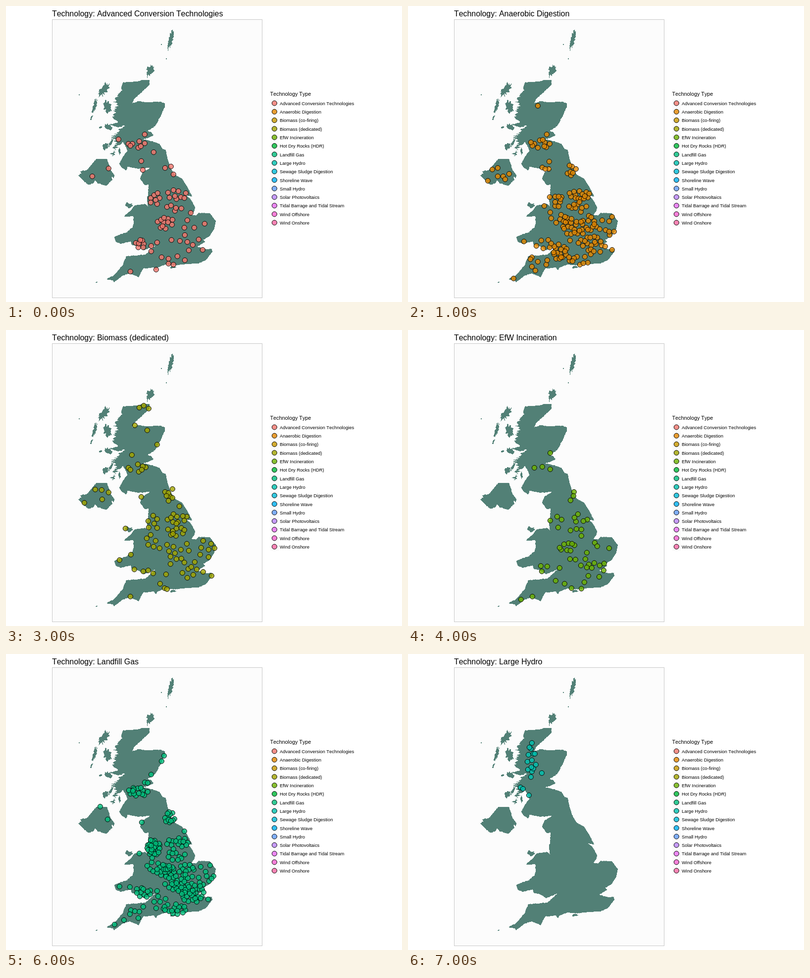
Recreate the animation shown at these times as an HTML page. Size 800 px wide and 600 px high, loop 8000 ms.

```html
<!DOCTYPE html>
<html lang="en">
<head>
<meta charset="utf-8">
<title>Renewable technologies map</title>
<style>
html, body { margin: 0; width: 100%; height: 100%; overflow: hidden; background: #fff; }
svg { display: block; width: 800px; height: 600px; font-family: "Liberation Sans", Arial, sans-serif; font-kerning: none; }
.land { fill: #528076; shape-rendering: crispEdges; }
.dot { stroke: #000; stroke-width: 1; fill-opacity: .8; }
.set { visibility: hidden; }
.head { font-size: 15.9px; white-space: pre; }
.key { font-size: 9.4px; }
</style>
</head>
<body>
<svg id="stage" viewBox="0 0 800 600"></svg>
<script>
const STEP = 1000;
const svg = document.getElementById('stage');

function add(parent, tag, attrs, text) {
  const el = document.createElementNS(svg.namespaceURI, tag);
  for (const k in attrs) el.setAttribute(k, attrs[k]);
  if (text) el.textContent = text;
  parent.appendChild(el);
  return el;
}

function random(seed) {
  return () => {
    seed = (seed * 1664525 + 1013904223) >>> 0;
    return seed / 4294967296;
  };
}

const parse = (s = '') => s.split(' ').filter(Boolean).map(p => p.split(',').map(Number));

// Subdivides a coastline and shakes the new points to make it ragged.
const shake = random(11);
function rough(text, ax, ay = ax) {
  const pts = parse(text);
  return pts.flatMap(([x, y], i) => {
    const [u, v] = pts[i + 1] || [x, y];
    const n = Math.max(1, Math.floor(Math.hypot(u - x, v - y) / 2));
    return Array.from({ length: n }, (_, k) => {
      const t = k / n, free = k ? 2 : 0;
      return [x + (u - x) * t + (shake() - .5) * free * ax, y + (v - y) * t + (shake() - .5) * free * ay];
    });
  });
}

// Ragged leaning ellipse for a small island.
function island([x, y, w, h, lean]) {
  const n = 8 + 2 * h;
  return Array.from({ length: n }, (_, k) => {
    const a = k / n * 2 * Math.PI, r = h > 2 ? 1.15 - .6 * shake() : 1;
    return [x + w * r * Math.cos(a) + lean * Math.sin(a), y + h * r * Math.sin(a)];
  });
}

const mainland = [
  // North and east Scotland
  ...rough('236,155 264,153 277,150 290,150 290,160 275,174 260,187 255,197 270,193 280,195 312,194 321,197 321,204 315,218 308,232 301,244 286,253 294,256 299,262 286,268 277,270 290,273 304,277', .6),
  // North Sea coast
  ...rough('311,280 316,290 323,292 327,312 334,332 341,342 356,350 368,370 376,386 363,384 372,390 382,408 380,417 374,423 384,425 390,419 412,420 424,436 421,451 411,467 398,474 403,478 386,488 404,493 416,492 417,498 404,515 388,522', .5),
  // Channel and Severn
  ...rough('362,523 342,526 322,524 306,530 303,536 299,530 277,532 268,550 250,542 235,547 218,560 215,556 203,554 219,545 236,525 243,507 282,504 301,486 279,495 266,487 254,484 252,477 232,482 222,478 219,468', .6),
  // Wales, Lancashire, Solway
  ...rough('228,464 244,459 256,448 258,440 257,426 238,427 256,410 260,404 280,401 287,406 285,393 287,380 288,362 280,363 271,350 276,337 291,328 268,330 245,326 243,334 234,327 229,320 234,309 245,294 243,287 236,275', .7),
  // West Highlands
  ...rough('232,281 226,283 218,304 213,306 222,272 213,268 229,252 238,242 225,246 211,241 225,236 217,222 224,207 219,188 227,180 233,165', 5, 1)
];

const ulster = rough('146,343 152,340 150,335 163,333 175,318 182,310 204,310 211,331 219,343 217,350 213,343 215,352 203,364 186,360 180,353 176,360 166,362 152,350', .8);

// x, y, half width, half height, lean
const islands = [
  [333, 68, 5, 23, -5], [314, 78, 1, 1, 0], [324, 107, 1, 1, 0], [291, 131, 8, 14, -4],
  [198, 169, 9, 15, -7], [179, 204, 4, 16, -4], [173, 226, 2, 5, -2], [148, 180, 1, 1, 0],
  [205, 205, 9, 14, 4], [207, 246, 9, 7, 3], [191, 246, 3, 2, -1], [212, 277, 3, 9, -4],
  [201, 284, 6, 8, -1], [229, 294, 3, 7, 0], [247, 404, 9, 6, 1], [337, 529, 7, 3, 0], [183, 560, 2, 1, -1]
];

// x, y, half width, half height
const regions = {
  glens: [248, 218, 9, 34], clyde: [266, 279, 24, 9], ulster: [188, 337, 22, 16], cumbria: [278, 324, 12, 11],
  tyne: [330, 333, 11, 14], mersey: [298, 392, 14, 17], york: [346, 382, 22, 12], trent: [343, 406, 18, 12],
  marches: [296, 426, 13, 16], midlands: [322, 439, 18, 13], fens: [367, 439, 18, 17], anglia: [402, 447, 18, 21],
  oxford: [342, 465, 22, 16], london: [376, 484, 24, 20], severn: [308, 497, 15, 19], wessex: [340, 516, 26, 11],
  gwent: [276, 483, 18, 10], devon: [264, 522, 20, 20]
};

// at: lone places, near: dots per region
const techs = [
  { name: 'Advanced Conversion Technologies', color: '#F8766D',
    at: '280,260 227,270 298,296 338,341 373,419 401,441 397,494 251,538 303,534',
    near: { clyde: 7, ulster: 2, cumbria: 2, tyne: 2, mersey: 7, york: 9, trent: 5, midlands: 11, fens: 3, oxford: 3, london: 4, severn: 3, wessex: 5, gwent: 8 } },
  { name: 'Anaerobic Digestion', color: '#E58700',
    at: '262,202 280,260 161,354 275,405 412,427 416,457 412,494 234,477 213,552',
    near: { clyde: 10, ulster: 6, cumbria: 4, tyne: 7, mersey: 9, york: 14, trent: 9, marches: 5, midlands: 13, fens: 13, anglia: 6, oxford: 12, london: 17, severn: 16, wessex: 9, gwent: 6, devon: 7 } },
  { name: 'Biomass (co-firing)', color: '#C99800',
    at: '268,264 285,268 330,311 268,491',
    near: { york: 4, trent: 4, mersey: 2, midlands: 3, london: 3, wessex: 1 } },
  { name: 'Biomass (dedicated)', color: '#A3A500',
    at: '269,157 278,153 288,159 260,193 285,203 305,232 254,253 158,350 273,338 350,357 241,402 229,466 252,455 421,442 415,498 251,540 320,523 325,525',
    near: { clyde: 7, ulster: 4, tyne: 7, mersey: 6, york: 10, trent: 9, marches: 5, midlands: 4, fens: 3, anglia: 6, oxford: 6, london: 8, severn: 3, gwent: 3 } },
  { name: 'EfW Incineration', color: '#6BB100',
    at: '287,249 406,442 228,546 251,540',
    near: { clyde: 3, tyne: 3, mersey: 4, york: 5, trent: 4, midlands: 8, fens: 3, oxford: 4, london: 9, severn: 2, wessex: 4, gwent: 3 } },
  { name: 'Hot Dry Rocks (HDR)', color: '#00BA38', at: '219,548 232,542' },
  { name: 'Landfill Gas', color: '#00BF7D',
    at: '319,206 314,217 293,244 280,260 286,261 190,309 205,335 274,341 360,359 269,404 412,428 408,497 229,471 250,472 238,539 219,548',
    near: { clyde: 15, tyne: 12, mersey: 28, york: 13, trent: 10, marches: 6, midlands: 23, fens: 14, anglia: 9, oxford: 20, london: 30, severn: 6, wessex: 16, gwent: 11, devon: 6 } },
  { name: 'Large Hydro', color: '#00C0AF',
    at: '250,180 258,224 270,241 227,270 232,273 244,286', near: { glens: 12 } },
  { name: 'Sewage Sludge Digestion', color: '#00BCD8' },
  { name: 'Shoreline Wave', color: '#00B0F6' },
  { name: 'Small Hydro', color: '#619CFF' },
  { name: 'Solar Photovoltaics', color: '#B983FF' },
  { name: 'Tidal Barrage and Tidal Stream', color: '#E76BF3' },
  { name: 'Wind Offshore', color: '#FD61D1' },
  { name: 'Wind Onshore', color: '#FF67A4' }
];

// Fills regions with dots, preferring spots away from those already placed.
function place({ at, near = {} }) {
  const rnd = random(5), dots = parse(at);
  const pick = ([x, y, rx, ry]) => {
    const a = rnd() * Math.PI * 2, d = Math.sqrt(rnd());
    return [Math.round(x + rx * d * Math.cos(a)), Math.round(y + ry * d * Math.sin(a))];
  };
  const gap = ([x, y]) => Math.min(...dots.map(([u, v]) => Math.hypot(x - u, y - v)));
  for (const name in near) {
    for (let i = 0; i < near[name]; i++) {
      const tries = Array.from({ length: 4 }, () => pick(regions[name]));
      dots.push(tries.reduce((a, b) => gap(b) > gap(a) ? b : a));
    }
  }
  return dots;
}

const dot = (parent, cx, cy, fill) => add(parent, 'circle', { class: 'dot', cx, cy, r: 5, fill });

// Panel and map
add(svg, 'rect', { x: 93.5, y: 27.5, width: 424, height: 564, fill: '#fcfcfc', stroke: '#c8c8c8' });
const land = add(svg, 'g', { class: 'land' });
[mainland, ulster, ...islands.map(island)].forEach(pts =>
  add(land, 'polygon', { points: pts.map(p => p.map(v => v.toFixed(1))).join(' ') }));

// Legend
add(svg, 'text', { x: 533.5, y: 182, 'font-size': 10.8 }, 'Technology Type');
techs.forEach(({ name, color }, i) => {
  const y = 197 + i * 17.3;
  add(svg, 'rect', { x: 534, y: y - 8.6, width: 17.3, height: 17.3, fill: '#fafafa' });
  dot(svg, 542.3, y, color);
  add(svg, 'text', { class: 'key', x: 553, y: y + 3.8 }, name);
});

// One group per technology, shown in turn
add(svg, 'text', { class: 'head', x: 93, y: 21 }, 'Technology:');
const sets = techs.filter(t => t.at).map(tech => {
  const g = add(svg, 'g', { class: 'set' });
  add(g, 'text', { class: 'head', x: 184, y: 21 }, tech.name);
  place(tech).forEach(([x, y]) => dot(g, x + .3, y + .3, tech.color));
  return g;
});

let shown = -1;
function draw(now) {
  const i = Math.floor(now / STEP) % sets.length;
  if (i === shown) return;
  sets.forEach((g, k) => { g.style.visibility = k === i ? 'visible' : 'hidden'; });
  shown = i;
}

const start = performance.now();
function tick() {
  draw(performance.now() - start);
  requestAnimationFrame(tick);
}
tick();
</script>
</body>
</html>
```
